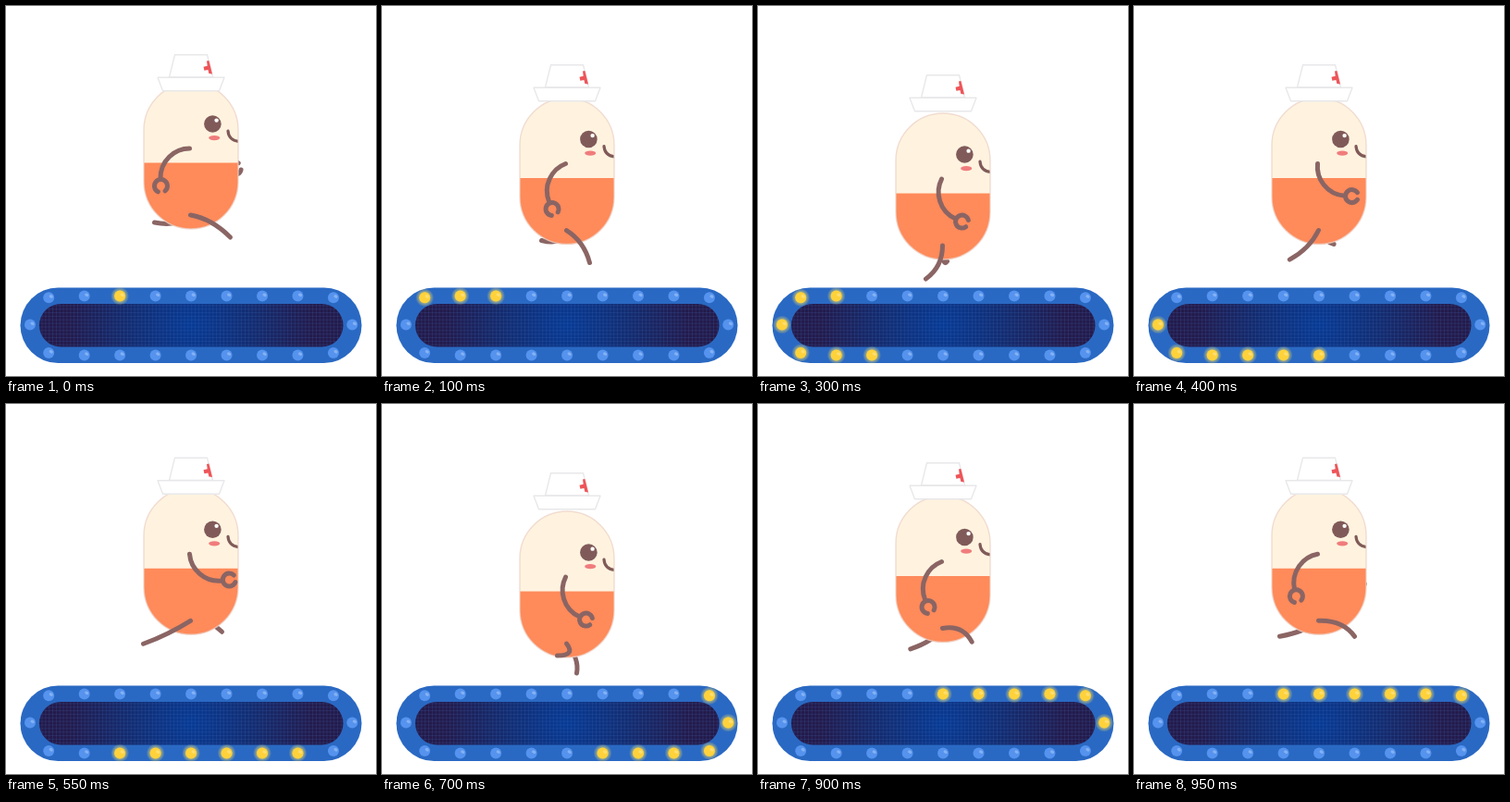
An HTML page for the animation above (1 s loop, 400x400 px).

```html
<!DOCTYPE html>
<html lang="en">
<head>
<meta charset="utf-8">
<title>Running capsule</title>
<style>
html, body { margin: 0; width: 100%; height: 100%; overflow: hidden; background: #fff; }
svg { display: block; width: 100vw; height: 100vh; }
.limb { fill: none; stroke: #8a6564; stroke-width: 5; stroke-linecap: round; stroke-linejoin: round; }
</style>
</head>
<body>
<svg viewBox="0 0 400 400">
  <defs>
    <clipPath id="pill"><rect x="149" y="83" width="102" height="158" rx="51"/></clipPath>
    <radialGradient id="screen" gradientUnits="userSpaceOnUse" cx="200" cy="345" r="132">
      <stop offset="0" stop-color="#073a94"/>
      <stop offset=".5" stop-color="#132c70"/>
      <stop offset="1" stop-color="#231a4a"/>
    </radialGradient>
    <pattern id="grid" width="3.85" height="3.85" patternUnits="userSpaceOnUse">
      <path d="M0 .4H3.85M.4 0V3.85" stroke="#4a78cc" stroke-opacity=".22" stroke-width=".8"/>
    </pattern>
    <radialGradient id="glow">
      <stop offset=".5" stop-color="#ffe25a" stop-opacity=".65"/>
      <stop offset="1" stop-color="#ffe25a" stop-opacity="0"/>
    </radialGradient>
    <g id="arm">
      <path d="M0 0C-16 0-32-1+12-31.5 33" visibility="hidden"/>
      <path class="limb" d="M0 0C-16 0-32 13-31.5 33"/>
      <path class="limb" stroke-width="4.6" d="M-34.2 46.8A7 7 0 1 1-26.5 45.9"/>
    </g>
  </defs>

  <rect x="15.5" y="304.5" width="369" height="81.5" rx="40.75" fill="#2a69c3"/>
  <rect x="36" y="322" width="328.500" height="46.5" rx="23.25" fill="url(#screen)"/>
  <rect x="36" y="322" width="328.500" height="46.5" rx="23.25" fill="url(#grid)"/>
  <g id="bulbs"></g>

  <g id="body">
    <use id="farArm" href="#arm"/>
    <path id="farLeg" class="limb"/>
    <g clip-path="url(#pill)">
      <rect x="149" y="83" width="102" height="87" fill="#fff3df"/>
      <rect x="149" y="169.5" width="102" height="72" fill="#ff8a5a"/>
      <path d="M240 135C240.500 142 245 146 253 146.500" fill="none" stroke="#805a59" stroke-width="3.2" stroke-linecap="round"/>
    </g>
    <rect x="149" y="83" width="102" height="158" rx="51" fill="none" stroke="#ecd2c6" stroke-opacity=".75" stroke-width="1.4"/>
    <circle cx="223.400" cy="127.500" r="9.300" fill="#805a59"/>
    <circle cx="227.600" cy="123.600" r="2.200" fill="#fff"/>
    <ellipse cx="225.200" cy="142.600" rx="6" ry="2.600" fill="#f07c7c"/>
    <path id="nearLeg" class="limb"/>
    <use id="nearArm" href="#arm"/>
  </g>

  <g id="hat" fill="#fff" stroke="#e8e8ea" stroke-width="1.4" stroke-linejoin="round">
    <path d="M182.500 52.700H217.500L223.500 77H176.500Z"/>
    <path d="M217 59.500L219.400 59L223 73.500L219.400 73L218.400 69L214.400 69.700L213.500 65.800L217.700 64.700Z" fill="#ee5559" stroke="none"/>
    <path d="M164 77.300H236L230.500 91.700H169.500Z"/>
  </g>
</svg>
<script>
const LOOP = 1000, STEP = 50, TAIL = 6, START = 2;
const $ = id => document.getElementById(id);

// Leg poses relative to the hip: time, bend x, bend y, foot x, foot y
const nearPoses = [
  [0, 23, 4, 43, 24], [100, 19, 12, 25, 35], [200, 13, 17, 10, 36],
  [300, 0, 23, -18, 36], [550, -24, 15, -51, 25], [700, 10, 13, -10, 13],
  [800, 13, -10, 17, 10], [950, 26, -1, 39, 17], [1000, 23, 4, 43, 24]
];
const farPoses = [
  [0, -14, 13, -39, 8], [100, -4, 17, -27, 11], [300, 0, 24, 5, 17],
  [550, 20, -2, 34, 12], [700, 14, 16, 11, 32], [800, -1, 18, -20, 33],
  [950, -14, 12, -42, 17], [1000, -14, 13, -39, 8]
];

function legPath(poses, t) {
  const i = poses.findIndex(p => p[0] > t);
  const a = poses[i - 1], b = poses[i];
  const k = (t - a[0]) / (b[0] - a[0]);
  const [, cx, cy, fx, fy] = a.map((v, n) => v + (b[n] - v) * k);
  return `M199.5 226q${cx} ${cy} ${fx} ${fy}`;
}

// Triangle wave: 0 at the ends of the period, 1 in the middle
const swing = (t, period) => 1 - Math.abs(1 - 2 * (t % period) / period);

// Bulbs run clockwise from the top left
const rowX = Array.from({ length: 9 }, (_, i) => 46.2 + i * 38.47);
const isEnd = i => i === 0 || i === 8;
const spots = [
  ...rowX.map((x, i) => [x, isEnd(i) ? 315.3 : 313.6]),
  [374.3, 344.6],
  ...rowX.map((x, i) => [x, isEnd(i) ? 375 : 377.4]).reverse(),
  [26, 344.6]
];
$("bulbs").innerHTML = spots.map(([x, y]) => `
  <g transform="translate(${x} ${y})">
    <circle r="10" fill="url(#glow)"/>
    <circle r="6"/>
    <ellipse cx="1.6" cy="-2.4" rx="2.2" ry="1.7" transform="rotate(30)" fill="#fff" fill-opacity=".28"/>
  </g>`).join("");
const bulbs = [...$("bulbs").children].map(g => g.children);

function drawBulbs(step) {
  const count = spots.length;
  const head = (START - step + count) % count;
  const lit = Math.min(step + 1, TAIL);
  bulbs.forEach(([glow, lamp], i) => {
    const on = (i - head + count) % count < lit;
    glow.setAttribute("visibility", on ? "visible" : "hidden");
    lamp.setAttribute("fill", on ? "#ffd23b" : "#5593ee");
  });
}

function draw(now) {
  const step = Math.floor(now % LOOP / STEP);
  const t = step * STEP;
  const drop = swing(t, LOOP / 2);
  const turn = 105 * swing(t, LOOP);
  const place = (id, value) => $(id).setAttribute("transform", value);
  place("body", `translate(0 ${41.3 * drop})`);
  place("hat", `translate(0 ${27.5 * drop})`);
  place("nearArm", `translate(198.500 154) rotate(${-turn})`);
  place("farArm", `translate(200 156) rotate(${turn - 105})`);
  $("nearLeg").setAttribute("d", legPath(nearPoses, t));
  $("farLeg").setAttribute("d", legPath(farPoses, t));
  drawBulbs(step);
}

const begin = performance.now();
function tick() {
  draw(performance.now() - begin);
  requestAnimationFrame(tick);
}
tick();
</script>
</body>
</html>
```
